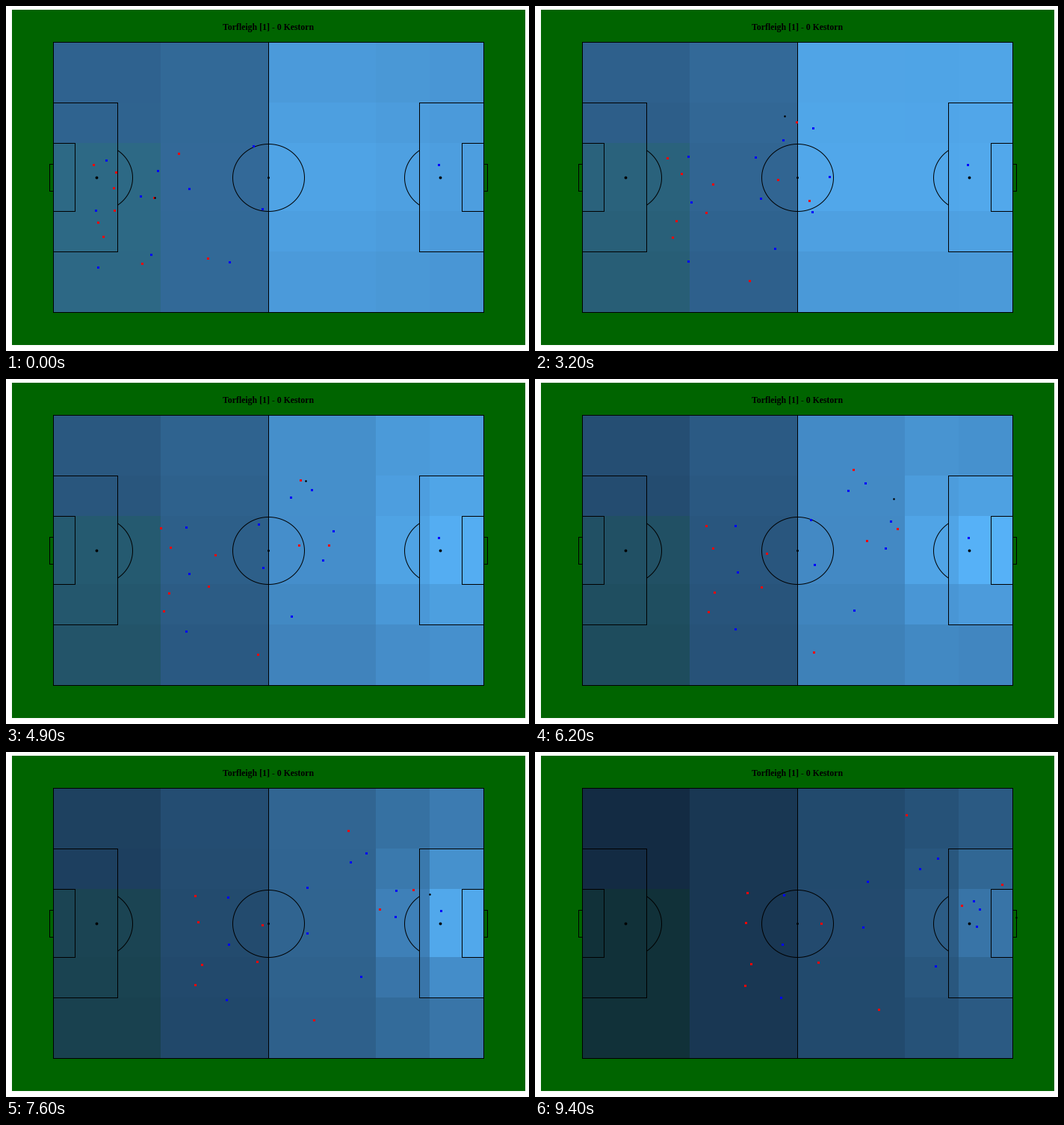
Animation of 700 by 461 pixels, one loop 10 s. Source, as a matplotlib script:

```python
import numpy as np
import matplotlib.pyplot as plt
from matplotlib.animation import FuncAnimation
from matplotlib.colors import LinearSegmentedColormap
from matplotlib.patches import Circle, Rectangle

W, H, DPI = 700, 461, 100
PX = 72 / DPI
FRAMES, LAST = 100, 94
MID = 229

XS = [63, 207, 351, 495, 567, 639]
YS = [48, 129, 183, 274, 328, 409]
HEAT = LinearSegmentedColormap.from_list(
    "heat", ["#132b43", "#22496c", "#326896", "#438ac5", "#56b1f7"], N=1024)
TINT = np.array([-2, 6, -10]) / 255


def run(x0, y0, x1, y1, pace=.95, bend=0):
    """A player's path: start, end, easing power and sideways bow."""
    def at(u):
        s = u ** pace
        return x0 + (x1 - x0) * s, y0 + (y1 - y0) * s + 4 * bend * s * (1 - s)
    return at


reds = [
    run(231, 197, 497, 84, .75, 8),
    run(147, 222, 282, 228),
    run(117, 212, 284, 188),
    run(144, 243, 383, 229, .87),
    run(145, 273, 379, 281),
    run(123, 289, 289, 283, .85),
    run(130, 308, 281, 312),
    run(182, 344, 460, 344, .9, 24),
    run(198, 256, 571, 205, 1, -7),
    run(270, 337, 625, 177, 1.2, -42),
]
blues = [
    run(134, 206, 333, 191),
    run(120, 273, 331, 257, .8, -4),
    run(123, 349, 329, 328, .85),
    run(194, 332, 536, 286, .92, 10),
    run(180, 254, 439, 234, .7, 12),
    run(203, 220, 445, 173, .9),
    run(245, 244, 515, 156, 1.05, -42),
    run(299, 342, 591, 233, 1.3, -54),
    run(343, 271, 587, 199, 1.45, -42),
    run(331, 187, 539, 142, 1.5, -24),
    run(579, 212, 595, 210, 8),
]
team = reds + blues

# Ball: dribble to the wing, cross, shot
ball_path = np.array([(0, 198, 255), (16, 288, 183), (32, 333, 147), (50, 404, 135),
                      (76, 566, 190), (88, 608, 184), (94, 643, 220)]).T


def keys(i, *points):
    return np.interp(i, *zip(*points))


def zone_heat(i, row, col):
    """Heat fades behind the ball and gathers in front of the right goal."""
    u = i / LAST
    focus = np.clip((i - 36) / 40, 0, 1)
    if col == 0:
        level, spread = .46 * (1 - u ** 2), .005
    elif col == 1:
        level, spread = .51 - .41 * u ** 2.4, .005
    elif col == 2:
        level = keys(i, (0, .91), (36, .94), (37, .81), (63, .74), (64, .60), (94, .26))
        spread = .03 - .02 * focus
    elif col == 3:
        level = keys(i, (0, .89), (36, .94), (37, .90), (71, .92), (72, .74), (94, .40))
        spread = .03 + .07 * focus
    else:
        level = keys(i, (0, .88), (36, .95), (62, 1), (76, .94), (94, .59))
        spread = .03 + .14 * focus
    tilt = .02 * np.sin(np.pi * u)
    return level * (1 - spread * abs(row - 2)) - tilt * (row - 2)


def zone_color(i, row, col):
    rgb = np.array(HEAT(float(np.clip(zone_heat(i, row, col), 0, 1)))[:3])
    if col == 0 and row > 1:
        rgb = rgb + TINT
    return tuple(np.clip(rgb, 0, 1))


fig = plt.figure(figsize=(W / DPI, H / DPI), dpi=DPI, facecolor="white")
ax = fig.add_axes([0, 0, 1, 1])
ax.set_xlim(-.5, W - .5)
ax.set_ylim(H - .5, -.5)
ax.axis("off")


def fill(x0, y0, x1, y1, color="black", z=1):
    return ax.add_patch(Rectangle((x0 - .5, y0 - .5), x1 - x0, y1 - y0, fc=color,
                                  lw=0, antialiased=False, zorder=z))


def box(x0, y0, x1, y1):
    for x in (x0, x1):
        fill(x, y0, x + 1, y1 + 1, z=3)
    for y in (y0, y1):
        fill(x0, y, x1 + 1, y + 1, z=3)


def arc(x, start, end):
    a = np.radians(np.linspace(start, end, 200))
    ax.plot(x + 48 * np.cos(a), MID + 45 * np.sin(a), color="black", lw=PX,
            solid_capstyle="butt", zorder=3)


fill(8, 5, 695, 453, "#006400")
zones = [(r, c, fill(XS[c], YS[r], XS[c + 1], YS[r + 1]))
         for r in range(5) for c in range(5)]

box(XS[0], YS[0], XS[-1], YS[-1])
fill(351, YS[0], 352, YS[-1], z=3)
for depth, y0, y1 in [(86, 129, 328), (29, 183, 274), (-5, 211, 247)]:
    for goal, side in [(63, 1), (639, -1)]:
        box(*sorted((goal, goal + side * depth))[:1], y0,
            max(goal, goal + side * depth), y1)
arc(351, 0, 360)
arc(121, -54, 54)
arc(581, 126, 234)
for x, r in [(121, 1.9), (351, 1.5), (581, 1.9)]:
    ax.add_patch(Circle((x, MID), r, fc="black", lw=0, zorder=3))

ax.text(351, 31.5, "Torfleigh [1] - 0 Kestorn", ha="center", va="baseline",
        family="Liberation Serif", weight="bold", size=11.7 * PX)


def dots(n, color, z):
    return ax.scatter([0] * n, [0] * n, s=(2.6 * PX) ** 2, c=color, lw=0,
                      antialiased=False, snap=False, zorder=z)


players = dots(len(team), ["red"] * len(reds) + ["blue"] * len(blues), 4)
ball = dots(1, ["black"], 5)


def update(i):
    i = min(i, LAST)
    for r, c, patch in zones:
        patch.set_facecolor(zone_color(i, r, c))
    players.set_offsets(np.round([path(i / LAST) for path in team]))
    t, x, y = ball_path
    ball.set_offsets(np.round([(np.interp(i, t, x), np.interp(i, t, y))]))
    return [players, ball]


anim = FuncAnimation(fig, update, frames=FRAMES, interval=100,
                     repeat=True, repeat_delay=0, blit=False)
plt.show()
```
